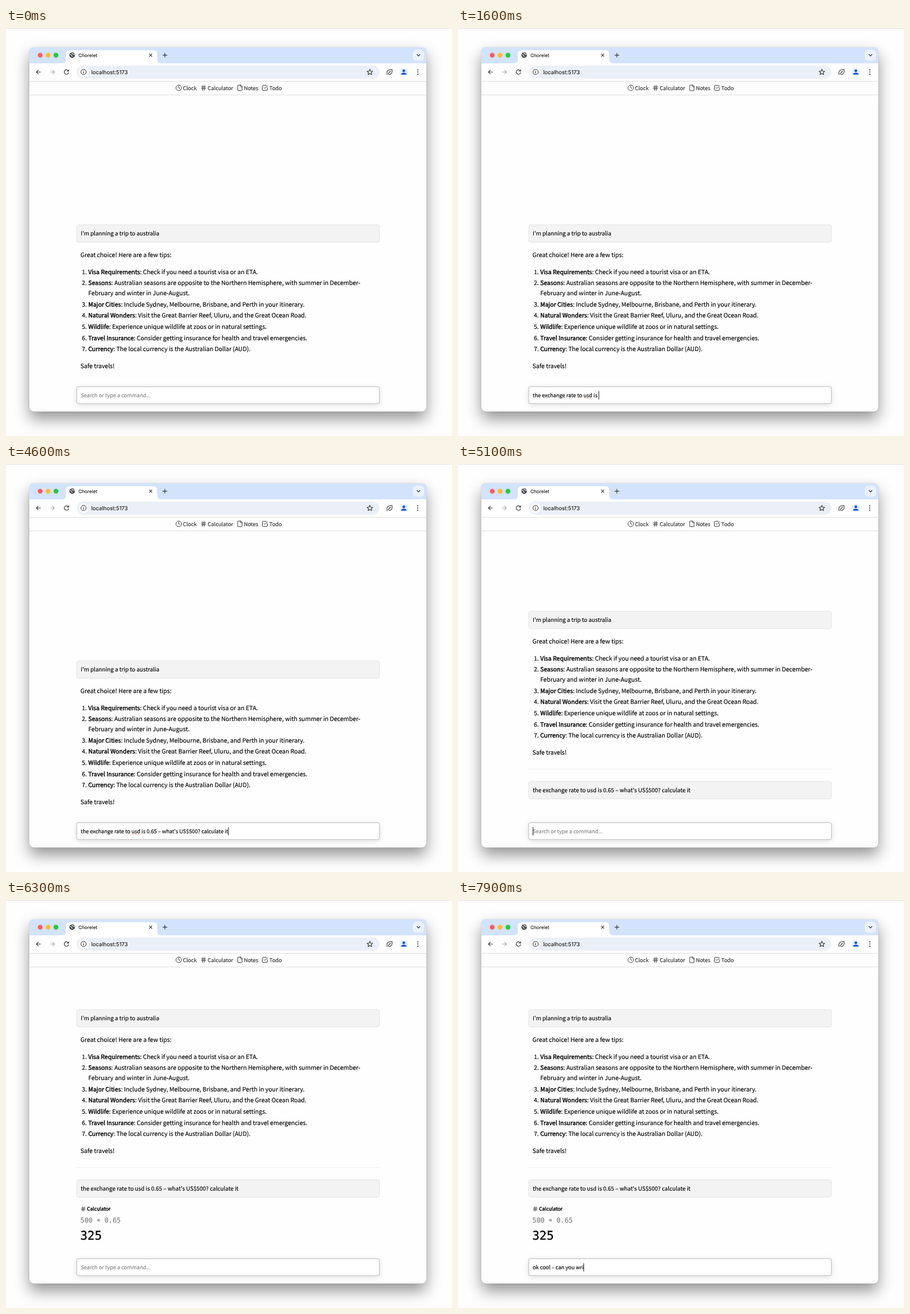
An HTML page for the animation above (8 s loop, 782 px wide and 716 px high).

```html
<!DOCTYPE html>
<html lang="en">
<head>
<meta charset="utf-8">
<title>Chat assistant</title>
<style>
  html, body { margin: 0; width: 100%; height: 100%; overflow: hidden; background: #fefefe; }
  body { position: relative; box-sizing: border-box; border-top: 1px solid #e4e4e4; }
  #window {
    position: absolute; left: 41px; top: 33px; width: 696px; height: 639px;
    border-radius: 7.5px; background: #fefefe;
    box-shadow: 0 0 1px rgba(0,0,0,.45), 0 13px 27px rgba(0,0,0,.42);
  }
  svg { position: absolute; left: 0; top: -1px; }
  text {
    font: 9.22px "Noto Sans CJK SC", "Noto Sans CJK JP", "Noto Sans CJK", sans-serif;
    text-rendering: geometricPrecision; white-space: pre;
    fill: currentColor; stroke: currentColor; stroke-width: .14px; color: #000;
  }
  .ui { font-family: Inter, sans-serif; color: #1f1f1f; }
  .nav text { font-size: 9.3px; color: #2c2c2c; }
  .bubble text { font-size: 9.87px; }
  .bubble rect { fill: #f3f3f3; stroke: #dfdfdf; stroke-width: .8; }
  .answer text { font-size: 10.5px; }
  .bold { stroke-width: .42px; }
  .mono { font-family: "DejaVu Sans Mono", monospace; stroke-width: .3px; }
  .icon { fill: none; stroke: #333; stroke-width: 1.1; stroke-linecap: round; stroke-linejoin: round; }
  .lucide { fill: none; stroke: #333; stroke-width: 2; stroke-linecap: round; stroke-linejoin: round; }
  #field { fill: #fff; stroke: #b4b4b4; stroke-width: .9; filter: drop-shadow(0 2px 5px rgba(0,0,0,.13)); }
</style>
</head>
<body>
<div id="window"></div>
<svg width="782" height="716" viewBox="0 0 782 716">
  <defs>
    <path id="hash" d="M4 9h16M4 15h16M10 3L8 21M16 3l-2 18"/>
  </defs>

  <!-- Tab strip -->
  <path d="M41 62V41.500a7.500 7.500 0 0 1 7.500-7.500H729.500a7.500 7.500 0 0 1 7.500 7.500V62Z" fill="#d3e3fd"/>
  <path d="M98 62q7 0 7-7V46q0-7 7-7H258q7 0 7 7v9q0 7 7 7Z" fill="#fff"/>
  <circle cx="60" cy="47.700" r="4.300" fill="#fe5f57"/>
  <circle cx="73.800" cy="47.700" r="4.300" fill="#febc2e"/>
  <circle cx="87.600" cy="47.700" r="4.300" fill="#28c840"/>
  <circle cx="116" cy="47.600" r="4.900" fill="#484b50"/>
  <path d="M112.300 46.200q2 .2 2.600 2t2 1.200M115.500 43.600q.3 2.400 2.400 2t2 2" fill="none" stroke="#fff" stroke-width="1.100"/>
  <text class="ui" x="127" y="50.700" style="font-size:8.200px">Chorelet</text>
  <path class="icon" d="M251.300 45.300l4.600 4.600m0-4.600l-4.600 4.600M275 47.600h7.200M278.600 44v7.200"/>
  <rect x="713.500" y="38" width="19.500" height="19.500" rx="6" fill="#ebf2fe"/>
  <path class="icon" d="M720.700 46.500l2.600 2.600 2.600-2.600"/>

  <!-- Toolbar -->
  <rect x="41" y="62" width="696" height="31.500" fill="#fff"/>
  <rect x="124" y="66" width="530.500" height="23" rx="11.500" fill="#ebf0f8"/>
  <path class="icon" d="M60.500 77.300H53.300M56.600 74l-3.300 3.300 3.300 3.300"/>
  <path class="icon" d="M77.700 77.300h7.200M81.600 74l3.300 3.300-3.300 3.300" style="stroke:#a9a9a9"/>
  <path class="icon" d="M109.500 75.400a3.900 3.900 0 1 0 .3 3M109.900 73.300v2.500h-2.500"/>
  <circle cx="136" cy="77.300" r="8.600" fill="#fff"/>
  <circle class="icon" cx="136" cy="77.300" r="4.500"/>
  <path class="icon" d="M136 77v2.400M136 75.100v.1"/>
  <text class="ui" x="149.500" y="80.800" style="font-size:9.550px">localhost:5173</text>
  <path class="icon" d="M638 72.500l1.400 3.200 3.500.3-2.600 2.300.8 3.400-3.100-1.800-3.100 1.800.8-3.400-2.600-2.300 3.500-.3Z"/>
  <path class="icon" d="M668 81.700q-1.200-7 4-8.400 2.600-.5 4.900-.6.500 4-.4 6-2.600 4.500-7 1.700M670.800 79.500q1.500-2.700 3.600-3.800"/>
  <circle cx="697.500" cy="77.300" r="7" fill="#e3edfd"/>
  <circle cx="697.500" cy="75.100" r="2.400" fill="#0b57d0"/>
  <path d="M692.700 81.800q0-3.300 4.800-3.300t4.800 3.300Z" fill="#0b57d0"/>
  <g fill="#333">
    <circle cx="722" cy="73.500" r="1.050"/><circle cx="722" cy="77.300" r="1.050"/><circle cx="722" cy="81.100" r="1.050"/>
  </g>

  <!-- App navigation -->
  <path d="M41 93.600H737M41 117.500H737" stroke="#dcdcdc" stroke-width=".9"/>
  <g class="nav">
    <g class="lucide">
      <path transform="translate(297 99.200) scale(.487)" d="M12 2a10 10 0 1 0 .01 0M12 6v6l4 2"/>
      <use href="#hash" transform="translate(340.500 99.200) scale(.487)"/>
      <path transform="translate(404.200 99.200) scale(.487)" d="M15 2H6a2 2 0 0 0-2 2v16a2 2 0 0 0 2 2h12a2 2 0 0 0 2-2V7ZM14 2v4a2 2 0 0 0 2 2h4"/>
      <path transform="translate(448 99.200) scale(.487)" d="M21 10.500V19a2 2 0 0 1-2 2H5a2 2 0 0 1-2-2V5a2 2 0 0 1 2-2h12.500M9 11l3 3L22 4"/>
    </g>
    <text x="310.300" y="108.700">Clock</text>
    <text x="353.600" y="108.700">Calculator</text>
    <text x="417.200" y="108.700">Notes</text>
    <text x="461.800" y="108.700">Todo</text>
  </g>

  <!-- Conversation -->
  <g id="log">
    <g class="bubble">
      <rect x="124" y="345.400" width="530.700" height="30.500" rx="2.900"/>
      <text x="131" y="364">I'm planning a trip to australia</text>
    </g>
    <g class="answer" id="answer">
      <text x="130.600" y="402">Great choice! Here are a few tips:</text>
      <text x="130.600" y="596.500">Safe travels!</text>
    </g>
    <g id="reply">
      <path d="M124 622.500H655" stroke="#ececec" stroke-width=".9"/>
      <g class="bubble">
        <rect x="124" y="644" width="530.700" height="30.500" rx="2.900"/>
        <text x="131" y="662.700" id="question"></text>
      </g>
      <g id="tool">
        <use href="#hash" class="lucide" transform="translate(130.300 690) scale(.43)"/>
        <text class="bold" x="142" y="698.300" style="font-size:8.600px">Calculator</text>
        <rect id="loading" x="124" y="708.300" width="530.700" height="103.800" rx="2.900" fill="#fff" stroke="#cfcfcf" stroke-width=".9"/>
        <g id="result">
          <text class="mono" x="130.600" y="718.700" style="font-size:11.700px;color:#8a8a8a">500 <tspan dy="2">*</tspan><tspan dy="-2"> 0.65</tspan></text>
          <text class="mono" x="130.300" y="749" style="font-size:20.900px">325</text>
        </g>
      </g>
    </g>
  </g>

  <!-- Command field -->
  <rect id="field" x="124" y="629.500" width="530.700" height="29.500" rx="2.900"/>
  <path id="squiggle" d="M220.800 650H236.500" stroke="#e8574f" stroke-width="1.200" stroke-dasharray="1.400 1.200" opacity=".75"/>
  <text id="typed" x="131" y="647.700"></text>
  <rect id="caret" y="637.300" width=".9" height="14.600" fill="#000"/>
</svg>

<script>
const $ = id => document.getElementById(id);
const show = (id, on) => $(id).style.display = on ? '' : 'none';

const LOOP = 8000, SENT = 4700, TOOL = 5600, DONE = 5800;
const PLACEHOLDER = 'Search or type a command...';
const question = "the exchange rate to usd is 0.65 – what's US$500? calculate it";
const followUp = 'ok cool – can you wri';

// Typing rhythm: [ms, characters typed]
const questionKeys = [[100, 0], [300, 5], [400, 5], [1000, 24], [1200, 24], [1600, 28], [1700, 28],
  [2600, 40], [2800, 42], [3200, 42], [3300, 44], [3400, 44], [3900, 52], [4000, 52], [4600, 62]];
const followUpKeys = [[6500, 0], [7100, 10], [7200, 10], [7900, 21]];
const caretOn = [[200, 3000], [3300, 4900], [5100, 5300], [5600, 5900], [6100, 6300], [6600, LOOP]];

const tips = [
  [431.5, 'Visa Requirements', ': Check if you need a tourist visa or an ETA.'],
  [451.2, 'Seasons', ': Australian seasons are opposite to the Northern Hemisphere, with summer in December-'],
  [468.7, '', 'February and winter in June-August.'],
  [488.5, 'Major Cities', ': Include Sydney, Melbourne, Brisbane, and Perth in your itinerary.'],
  [508.2, 'Natural Wonders', ': Visit the Great Barrier Reef, Uluru, and the Great Ocean Road.'],
  [527.9, 'Wildlife', ': Experience unique wildlife at zoos or in natural settings.'],
  [547.6, 'Travel Insurance', ': Consider getting insurance for health and travel emergencies.'],
  [567.3, 'Currency', ': The local currency is the Australian Dollar (AUD).'],
];
let number = 0;
$('answer').innerHTML += tips.map(([y, title, body]) =>
  (title ? `<text x="133" y="${y}">${++number}.</text>` : '') +
  `<text x="144.2" y="${y}"><tspan class="bold">${title}</tspan>${body}</text>`).join('');
$('question').textContent = question;

function typedCount(keys, t) {
  const next = keys.findIndex(key => key[0] > t);
  if (next === 0) return 0;
  if (next < 0) return keys[keys.length - 1][1];
  const [t0, n0] = keys[next - 1], [t1, n1] = keys[next];
  return Math.round(n0 + (n1 - n0) * (t - t0) / (t1 - t0));
}

function draw(t) {
  const asking = t < SENT;
  const text = asking
    ? question.slice(0, typedCount(questionKeys, t))
    : followUp.slice(0, typedCount(followUpKeys, t));
  const scroll = asking ? 0 : t < TOOL ? 87 : t < DONE ? 211 : 153;

  $('log').setAttribute('transform', `translate(0 ${-scroll})`);
  show('reply', !asking);
  show('tool', t >= TOOL);
  show('loading', t < DONE);
  show('result', t >= DONE);

  const typed = $('typed');
  typed.textContent = text || PLACEHOLDER;
  typed.style.color = text ? '' : '#858585';
  show('squiggle', asking && text.length > 24);
  show('caret', caretOn.some(([from, to]) => t >= from && t < to));
  $('caret').setAttribute('x', 131 + (text ? typed.getComputedTextLength() : 0));
}

function tick() {
  draw(Math.floor(performance.now() % LOOP / 100) * 100);
  requestAnimationFrame(tick);
}
tick();
</script>
</body>
</html>
```
